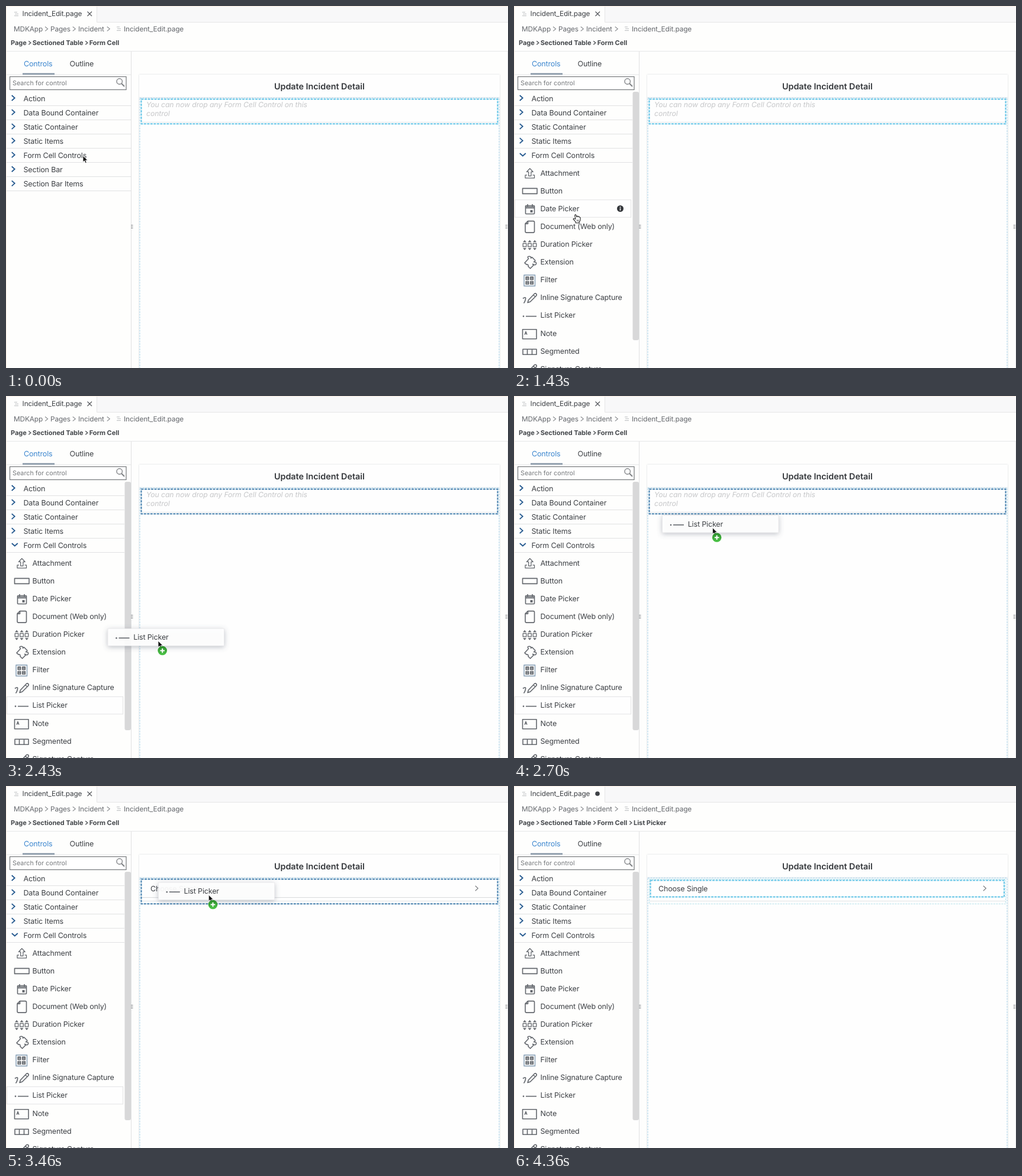
An HTML page that plays this animation: 848x612 px, repeating every 5.36 s.

```html
<!DOCTYPE html>
<html lang="en">
<head>
<meta charset="utf-8">
<title>Drag a list picker into a form cell</title>
<style>
html, body { margin: 0; width: 100%; height: 100%; overflow: hidden; background: #fefefd; }
svg { display: block; width: 848px; height: 612px; }
text {
  font-family: Inter, "Open Sans", "Liberation Sans", sans-serif;
  font-size: 12.5px; letter-spacing: -.16px; fill: #3d4045;
  text-rendering: geometricPrecision; white-space: pre;
}
.tab { font-size: 11.8px; letter-spacing: -.12px; }
.crumb { font-size: 11.8px; letter-spacing: -.1px; fill: #66696e; }
.trail { font-size: 11px; letter-spacing: -.04px; font-weight: 650; fill: #45484c; }
.title { font-size: 14.4px; letter-spacing: -.04px; font-weight: 620; fill: #34373b; }
.hint { font-size: 12.2px; letter-spacing: -.07px; font-style: italic; fill: #c6c7c9; }
.find { font-size: 10.8px; letter-spacing: 0; fill: #777a7d; }
.icon { fill: none; stroke: #63676d; stroke-width: 1.6; stroke-linejoin: round; }
.icon .solid { fill: #63676d; stroke: none; }
</style>
</head>
<body>
<svg id="stage" viewBox="0 0 848 612" xmlns="http://www.w3.org/2000/svg"></svg>
<script>
const LOOP = 5360, TICK = 200 / 3;
const ROW = 24.05, ITEM = 30.1, ITEM_TOP = 282.3;
const EXPAND = 730, GRAB = 1895, RELEASE = 3595, PREVIEW = 3095, UNHOVER = 4130, HIDE = 4300;

const text = (x, y, s, cls = '', extra = '') => `<text x="${x}" y="${y}" class="${cls}" ${extra}>${s}</text>`;
const path = (d, stroke, width = 1, extra = '') =>
  `<path d="${d}" fill="none" stroke="${stroke}" stroke-width="${width}" ${extra}/>`;
const rect = (x, y, w, h, extra) => `<rect x="${x}" y="${y}" width="${w}" height="${h}" ${extra}/>`;
const group = (id, body, extra = '') => `<g id="${id}" ${extra}>${body}</g>`;
const hline = (x1, x2, y, color) => path(`M${x1} ${y}H${x2}`, color);
const angle = (x, y, color, width = 1.1, w = 4.5, h = 3.7) =>
  path(`M${x - w / 2} ${y - h}L${x + w / 2} ${y}L${x - w / 2} ${y + h}`, color, width);
const boldAngle = x => angle(x, 62.2, '#55585c', 1.5, 3.5, 3);
const fileMark = (x, y) => path(`M${x} ${y}h5M${x + 1} ${y + 3}h6M${x} ${y + 6}h7`, '#b9bcbf');
const grip = x => path(`M${x} 370.5h3.5M${x} 373h3.5M${x} 375.5h3.5`, '#8d9093', 1.2);

// Icons are drawn around the centre of their list row.
const pencil = '<path d="M-2 3.500L7.500 -6.500Q9.500 -8.500 11 -7T11 -3.500L1 6.500L-3.500 8ZM6 -5L9.500 -2"/>';
const listIcon = '<circle class="solid" cx="-10.500" cy="1" r="1.300"/><path d="M-6.500 1H11.500"/>';
const cells = (xs, f) => xs.map(f).join('');
const items = [
  ['Attachment', '<path d="M-4.500 3H-7.500V8H8V3H5M-1.800 4.500V-2.500H-5L.300 -8L5.600 -2.500H2.400V4.500Z" stroke-width="1.300"/>'],
  ['Button', '<rect x="-12" y="-4.500" width="24.500" height="9"/>'],
  ['Date Picker', '<rect x="-7" y="-5.500" width="15" height="14" rx="1"/><path d="M-7 -3.500H8M-7 -1.500H8M-3.500 -8V-4M4.500 -8V-4"/><rect class="solid" x="1" y="2" width="4" height="4"/>'],
  ['Document (Web only)', '<path d="M-3 -9.500H6Q8 -9.500 8 -7.500V8Q8 10 6 10H-5.500Q-7.500 10 -7.500 8V-5ZM-3 -9.500V-5H-7.500"/>'],
  ['Duration Picker', cells([-8.5, 0, 8.5], x =>
    `<rect x="${x - 2.8}" y="-1.800" width="5.600" height="5.500" stroke-width="1.300"/><path class="solid" d="M${x - 3} -4L${x} -7.500L${x + 3} -4ZM${x - 3} 6L${x} 9.500L${x + 3} 6Z"/>`)],
  ['Extension', '<path d="M-8.500 1L-2 -6Q-5 -10 -1 -10T2 -7L4 -8.500L9.500 -3L7 -0.500Q12 -1 11 2.500T5 3L6.500 5L1 10.500L-2.500 7Q-2 3 -5 4Z"/>'],
  ['Filter', '<rect x="-9.500" y="-8.500" width="18.500" height="18.500" stroke="#93a9bd"/>' + cells([-6.3, 1.3], x => cells([-5.3, 2.3], y =>
    `<rect x="${x}" y="${y}" width="4.500" height="4.500"/><path d="M${x} ${y + 2.2}h4.500"/>`))],
  ['Inline Signature Capture', pencil + '<path d="M-11.500 1Q-6 -3 -7 2T-10 9"/>'],
  ['List Picker', listIcon],
  ['Note', '<rect x="-12" y="-7" width="23.500" height="16"/><path d="M-8.500 2L-6.500 -3.500L-4.500 2M-8 0.500H-5" stroke-width="1.200"/>'],
  ['Segmented', '<path d="M-11.500 -3.500H11.500V5.500H-11.500ZM-4 -3.500V5.500M4 -3.500V5.500"/>'],
  ['Signature Capture', pencil],
];
const itemY = i => ITEM_TOP + ITEM * i;
const icon = (x, y, body) => `<g class="icon" transform="translate(${x} ${y})">${body}</g>`;

const headings = ['Action', 'Data Bound Container', 'Static Container', 'Static Items',
  'Form Cell Controls', 'Section Bar', 'Section Bar Items'];
const heading = (name, i) => {
  const y = 156.8 + ROW * i;
  const mark = angle(12.2, y - 1.3, '#24598f', 1.8, 5, 4.5);
  return (i === 4 ? group('closedMark', mark) : mark) +
    text(29.5, y + 4.2, name) + hline(0, 211, Math.floor(y + 11.4) + .5, '#e1e2e3');
};

const header =
  rect(154, 1, 694, 26, 'fill="#f8f8f9"') +
  path('M153.500 1V27.500H848', '#e6e6e7') +
  fileMark(14, 10.5) + text(27.6, 17, 'Incident_Edit.page', 'tab') +
  group('closeMark', path('M137.500 9.500l7.500 7.500M145 9.500l-7.500 7.500', '#55585c', 1.2)) +
  group('dirtyMark', '<circle cx="141" cy="13" r="3.800" fill="#3e4145"/>') +
  text(13, 42.7, 'MDKApp', 'crumb') + angle(68.3, 38.7, '#85888b') +
  text(75, 42.7, 'Pages', 'crumb') + angle(115, 38.7, '#85888b') +
  text(122, 42.7, 'Incident', 'crumb') + angle(173, 38.7, '#85888b') +
  fileMark(187, 35.5) + text(199, 42.7, 'Incident_Edit.page', 'crumb') +
  text(8, 66, 'Page', 'trail') + boldAngle(40) +
  text(44.7, 66, 'Sectioned Table', 'trail') + boldAngle(136) +
  text(140.7, 66, 'Form Cell', 'trail') +
  group('lastCrumb', boldAngle(197) + text(202, 66, 'List Picker', 'trail')) +
  hline(0, 848, 76.5, '#e6e7e8');

const sidebar =
  path('M211.500 77V612', '#e0e1e2') + path('M847.500 77V612', '#e9eaeb') +
  text(30, 101.5, 'Controls', '', 'style="fill:#3b86cf"') + text(107.5, 101.5, 'Outline') +
  hline(0, 211, 116, '#e4e5e6') + rect(28, 113.5, 54, 2.5, 'fill="#8797a7"') +
  rect(6.5, 119.5, 196.5, 22, 'fill="#fff" stroke="#75787b" stroke-width="1.200"') +
  text(11, 134, 'Search for control', 'find') +
  '<circle cx="191.700" cy="127.500" r="4.700" fill="none" stroke="#808386" stroke-width="1.400"/>' +
  path('M195 131l5 5', '#808386', 2) +
  headings.map(heading).join('') +
  group('expanded',
    rect(1, 265, 209.5, 347, 'fill="#fefefd"') + rect(200, 144, 11, 468, 'fill="#fefefd"') +
    path('M9.800 249L14.800 253.500L19.800 249', '#24598f', 1.8) +
    rect(200.5, 145, 10.5, 420, 'rx="3" fill="#d8d8d9"') +
    rect(1.5, 0, 196, 29.5, 'id="hover" fill="#fefefe" stroke="#e4e4e5"') +
    items.map(([name, art], i) => icon(26.5, itemY(i) + .5, art) + text(44.5, itemY(i) + 4.3, name)).join('') +
    group('info', '<circle r="5.500" fill="#34373b"/><path d="M0 -3.200v1.600M0 -.700v3.900" stroke="#fff" stroke-width="1.500"/>'));

const form =
  '<g filter="url(#soft)">' + rect(225, 116, 609, 510, 'fill="#fefefe"') + '</g>' +
  text(529.3, 140.8, 'Update Incident Detail', 'title', 'text-anchor="middle"') +
  hline(225, 834, 154.5, '#dfe8ee') +
  path('M226 156V612M833 156V612M226 155.800H833', '#a8d2e8', 1, 'stroke-dasharray="3 1.500"') +
  rect(228, 157, 603, 42, 'fill="#fefefe"') +
  group('hint', hline(229, 830, 196.5, '#e4e6e8') +
    text(237, 171, 'You can now drop any Form Cell Control on this', 'hint') + text(237, 185.5, 'control', 'hint')) +
  group('picker', hline(229, 830, 194.5, '#e2e4e6') + group('pickerLine', hline(229, 830, 188.5, '#d9dbdd')) +
    text(244, 178.2, 'Choose Single') + angle(795, 173, '#7c7f82', 1.2, 4.5, 4.2)) +
  rect(228.5, 157.5, 602, 41.8, 'id="cell" fill="none"') +
  rect(230.5, 159.5, 597.5, 28, 'id="chosen" fill="none" stroke="#62c4e6" stroke-width="2" stroke-dasharray="4 1.500"');

const ghost = group('ghost',
  rect(0, 0, 196.5, 29, 'fill="#fff" fill-opacity=".920" stroke="#e2e2e4" stroke-width=".600" filter="url(#lift)"') +
  icon(25, 15, listIcon) + text(43.3, 19.3, 'List Picker'));

const pointer =
  group('arrow', '<path d="M0 0V10.800L2.500 8.600L4.200 12.600L6.200 11.700L4.500 7.900H8Z" fill="#111" stroke="#fff" stroke-width=".800"/>') +
  group('beam', path('M-2.500 -6Q0 -6 0 -4V4Q0 6 -2.500 6M2.500 -6Q0 -6 0 -4M0 4Q0 6 2.500 6M-1.500 1.500H1.500', '#333')) +
  group('hand', '<path d="M-2.500 2Q-1.800 0 -.500 1.500L1 5L1.500 3.500Q3 3 3.500 4.500Q5 3.800 5.500 5.200Q7 5 7 7L6.500 11L5 13V15H-1V13L-5 8.500Q-5 6.800 -2.500 8L-1.200 8.500Z" fill="#fff" stroke="#222" stroke-width="1.100" stroke-linejoin="round"/><path d="M1.500 9.500v3M3.500 9.500v3" stroke="#222" stroke-width=".800"/>') +
  group('plus', '<circle cx="7.200" cy="16.500" r="7.800" fill="url(#green)"/><path d="M3.400 16.500h7.600M7.200 12.700v7.600" stroke="#fff" stroke-width="2"/>');

document.getElementById('stage').innerHTML =
  `<defs>
    <filter id="soft" x="-5%" y="-5%" width="110%" height="110%"><feDropShadow dx="0" dy="0" stdDeviation="1.300" flood-color="#8a939c" flood-opacity=".400"/></filter>
    <filter id="lift" x="-15%" y="-70%" width="130%" height="260%"><feDropShadow dx="0" dy="2" stdDeviation="4" flood-color="#50586a" flood-opacity=".400"/></filter>
    <linearGradient id="green" x2="0" y2="1"><stop offset="0" stop-color="#2a8a2a"/><stop offset="1" stop-color="#4fc84a"/></linearGradient>
  </defs>` +
  rect(0, 0, 848, 612, 'fill="#fefefd"') + header + sidebar + form + grip(211) + grip(843.5) +
  path('M.500 612V.500H848', '#fbeee3') + ghost + group('pointer', pointer);

const el = {};
document.querySelectorAll('[id]').forEach(node => el[node.id] = node);
const show = (id, on) => el[id].setAttribute('visibility', on ? 'visible' : 'hidden');
const move = (id, x, y) => el[id].setAttribute('transform', `translate(${x.toFixed(2)} ${y.toFixed(2)})`);

// Pointer tip: time, x, y
const route = [
  [0, 130, 253], [30, 130, 253], [530, 117, 257], [1230, 117, 257], [1500, 101, 385], [1730, 86, 517],
  [1830, 85.5, 519], [1897, 91, 524], [2030, 160, 493], [2130, 215, 462], [2297, 215, 462], [2430, 257, 414],
  [2563, 304, 315], [2697, 335.5, 222.5], [2830, 339, 207], [2897, 339, 207], [3163, 341, 189], [3397, 342.3, 184],
  [3497, 342.3, 184], [3863, 332, 186], [LOOP, 332, 186],
];
function tip(t) {
  const i = Math.max(1, route.findIndex(p => p[0] >= t));
  const [a, x, y] = route[i - 1], [b, u, v] = route[i];
  const k = (t - a) / (b - a);
  return [x + (u - x) * k, y + (v - y) * k];
}

function draw(t) {
  const step = t < 30 ? 0 : 30 + Math.floor((t - 25) / TICK) * TICK;
  const [x, y] = tip(step);
  const open = t >= EXPAND, drag = t >= GRAB && t < RELEASE, done = t >= RELEASE;
  const preview = t >= PREVIEW;
  const overItems = open && t < GRAB && y > 268;
  const beam = t >= 160 && t < GRAB && !overItems;
  const row = overItems ? Math.floor((y + 2 - ITEM_TOP + ITEM / 2) / ITEM) : 8;
  const hover = overItems || (t >= GRAB && t < UNHOVER);

  show('closedMark', !open);
  el.expanded.setAttribute('display', open ? 'inline' : 'none');
  show('hover', hover);
  el.hover.setAttribute('y', itemY(row) - 14.8);
  show('info', overItems);
  move('info', 179.5, itemY(row));

  show('closeMark', !done);
  show('dirtyMark', done);
  show('lastCrumb', done);
  show('hint', !preview);
  show('picker', preview);
  show('pickerLine', preview && !done);
  show('chosen', done);
  el.cell.setAttribute('stroke', drag ? '#4680ad' : done ? '#b4e1ea' : '#62c4e6');
  el.cell.setAttribute('stroke-width', done ? 1 : 2);
  el.cell.setAttribute('stroke-dasharray', done ? '3 1.5' : '4 1.5');

  show('ghost', drag);
  move('ghost', x - 85, y - 20.8);
  show('arrow', t < HIDE && !beam && !overItems);
  show('beam', beam);
  show('hand', overItems);
  show('plus', drag);
  move('pointer', x, y);
}

function loop(now) {
  draw(now % LOOP);
  requestAnimationFrame(loop);
}
draw(0);
requestAnimationFrame(loop);
</script>
</body>
</html>
```
